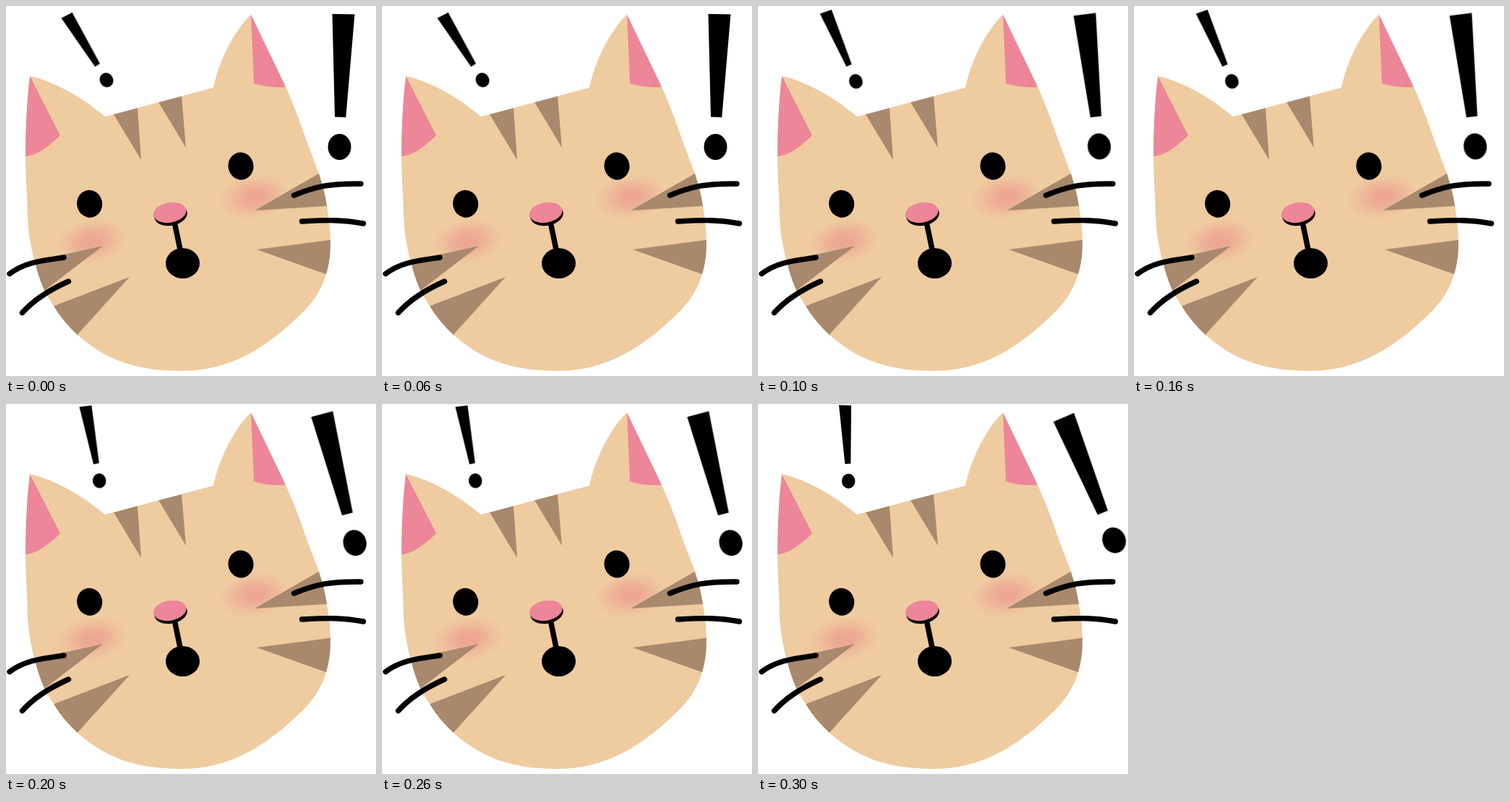
Write an HTML page that moves like this. It is 512 by 512 pixels and loops after 400 ms.

```html
<!DOCTYPE html>
<html lang="en">
<head>
<meta charset="utf-8">
<title>Surprised cat</title>
<style>
  html, body { margin: 0; width: 100%; height: 100%; overflow: hidden; background: #fff; }
  svg { display: block; width: 100%; height: 100%; }
  .face { fill: #efcba0; }
  .pink { fill: #ec8698; }
  .stripes { fill: #a8896d; }
  .whiskers { fill: none; stroke: #000; stroke-width: 7.4; stroke-linecap: round; }
  .mark { animation: 400ms step-end infinite; }
  .left { transform-origin: 123.8px 77.8px; animation-name: tilt-left; }
  .right { transform-origin: 462px 118.3px; animation-name: tilt-right; }
  @keyframes tilt-left {
    0% { transform: rotate(-29deg); }
    25% { transform: rotate(-20.8deg); }
    50% { transform: rotate(-8deg); }
    75%, 100% { transform: rotate(0deg); }
  }
  @keyframes tilt-right {
    0% { transform: rotate(0deg); }
    25% { transform: rotate(-8deg); }
    50% { transform: rotate(-16deg); }
    75%, 100% { transform: rotate(-24deg); }
  }
</style>
</head>
<body>
<svg viewBox="0 0 512 512">
  <defs>
    <path id="head" d="M33 97C66 104 105 126 137 153L287 113C294 78 316 33 339 12L387 112
      C399 138 408 164 415 184C422 204 428 218 433 232C438 247 442 262 444 277
      C447 295 449 309 449 325C449 340 448 355 443 371C435 398 420 416 402 432
      C358 474 308 505 243 505C185 505 140 492 99 455C86 443 75 430 66 415
      C53 397 46 378 41 358C33 330 30 308 29.5 280C29 255 27 235 27 208C27 170 29 130 33 97Z"/>
    <clipPath id="inside"><use href="#head"/></clipPath>
    <radialGradient id="blush">
      <stop offset="0" stop-color="#eda492"/>
      <stop offset=".3" stop-color="#eda492" stop-opacity=".85"/>
      <stop offset=".7" stop-color="#eda492" stop-opacity=".3"/>
      <stop offset="1" stop-color="#eda492" stop-opacity="0"/>
    </radialGradient>
    <ellipse id="cheek" rx="50" ry="31" fill="url(#blush)"/>
    <ellipse id="eye" rx="17.5" ry="19" transform="rotate(-10)"/>
  </defs>

  <use href="#head" class="face"/>
  <g clip-path="url(#inside)">
    <path class="pink" d="M33 97L75 179Q45 209 24 208V97Z"/>
    <path class="pink" d="M339 12L343 107Q362 114 390 112V80Z"/>
    <use href="#cheek" transform="translate(119 325) rotate(-10)"/>
    <use href="#cheek" transform="translate(344 264) rotate(-10)"/>
    <path class="stripes" d="M149 150L182 141L187 213Z M211 133L243 125L249 196Z
      M344 283L437 229.5L450 276.5Z M347 337L455 323L450 373.5Z
      M134 332L30 355L45 400Z M171 375L60 417.5L95 459Z"/>
  </g>

  <use href="#eye" x="0" transform="translate(115.7 273.7)"/>
  <use href="#eye" transform="translate(325 221.5)"/>
  <ellipse rx="23" ry="14.5" transform="translate(228 289.3) rotate(-10)"/>
  <ellipse class="pink" rx="23" ry="13.8" transform="translate(226.8 285.8) rotate(-10)"/>
  <path d="M233.5 301L241 337" stroke="#000" stroke-width="7.5"/>
  <ellipse cx="244.5" cy="356" rx="23.5" ry="21"/>

  <g class="whiskers">
    <path d="M80 348C52 352 27 354 5 370.5"/>
    <path d="M86.500 381C64 391 40 405 22.500 424.500"/>
    <path d="M398.500 262C430 249 450 245.500 491 246"/>
    <path d="M409.500 298C445 296 465 295.500 494.500 301"/>
  </g>

  <g class="mark left">
    <path d="M112 1.500L129 2L128.300 82.500L120.300 83Z"/>
    <ellipse cx="125.200" cy="106.800" rx="9.200" ry="10.200"/>
  </g>
  <g class="mark right">
    <path d="M451.500 11L482.500 11.500L470.300 154L455 153.500Z"/>
    <ellipse cx="461.500" cy="195" rx="16" ry="18"/>
  </g>
</svg>
</body>
</html>
```
